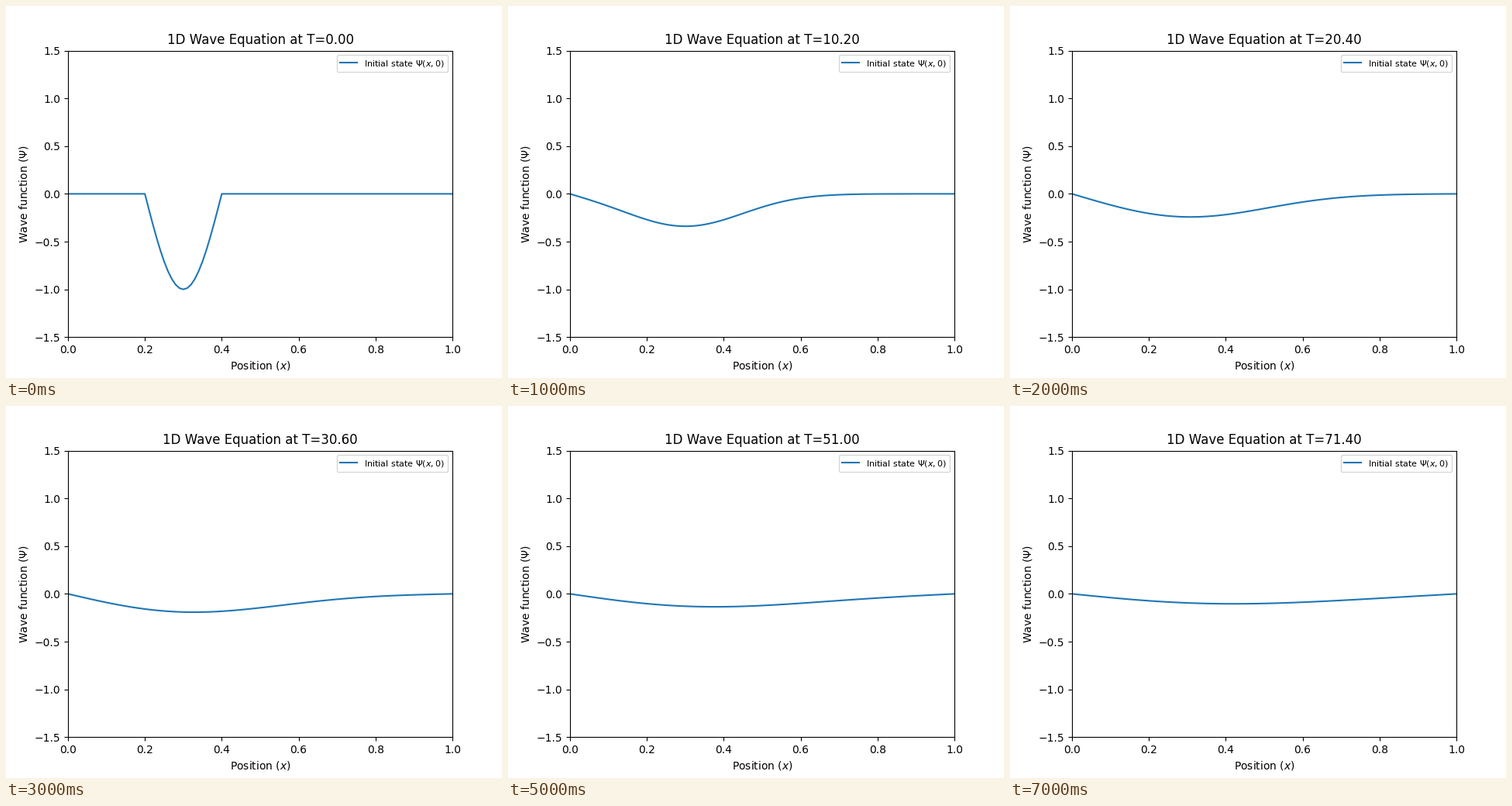
A matplotlib script that plays this animation: 640 px wide and 480 px high, repeating every 7500 ms.

```python
import numpy as np
import matplotlib.pyplot as plt
from matplotlib.animation import FuncAnimation

FRAMES = 15
INTERVAL = 500      # ms
TIME_STEP = 5.1     # simulated time between frames
DIFFUSIVITY = 1e-3
N = 100             # grid cells

x = np.linspace(0, 1, N + 1)
inside = (x > 0.2) & (x < 0.4)
start = np.where(inside, -np.sin(5 * np.pi * (x - 0.2)), 0.0)

# Sine modes on the grid satisfy the fixed ends and decay independently.
k = np.arange(1, N)
modes = np.sin(np.pi * np.outer(x, k))
weights = 2 / N * modes.T @ start


def state(t):
    if t == 0:
        return start
    return modes @ (weights * np.exp(-DIFFUSIVITY * (np.pi * k) ** 2 * t))


fig, ax = plt.subplots(figsize=(6.4, 4.8), dpi=100)
line, = ax.plot(x, start, label=r"Initial state $\Psi(x,0)$")
ax.set_xlim(0, 1)
ax.set_ylim(-1.5, 1.5)
ax.set_xlabel("Position ($x$)")
ax.set_ylabel(r"Wave function ($\Psi$)")
ax.legend(loc="upper right", fontsize=8)
title = ax.set_title("1D Wave Equation at T=0.00")


def update(i):
    t = i * TIME_STEP
    line.set_ydata(state(t))
    title.set_text(f"1D Wave Equation at T={t:.2f}")
    return line, title


anim = FuncAnimation(fig, update, frames=FRAMES, interval=INTERVAL,
                     repeat=True, repeat_delay=0, blit=False)
plt.show()
```
